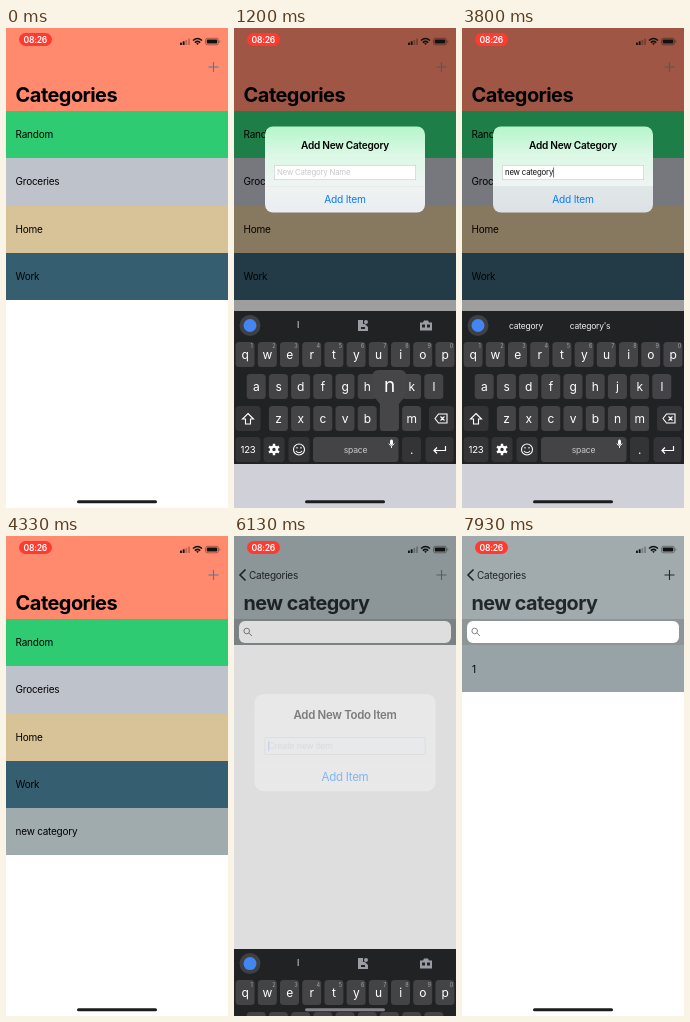
Recreate the animation shown at these times as an HTML page with a canvas. Size 222x480 px, loop 8000 ms.

```html
<!DOCTYPE html>
<html lang="en">
<head>
<meta charset="utf-8">
<title>Todo categories</title>
<style>
  html, body { margin: 0; width: 100%; height: 100%; overflow: hidden; background: #fff; }
  canvas { display: block; width: 222px; height: 480px; }
</style>
</head>
<body>
<canvas id="stage" width="222" height="480"></canvas>
<script>
const ctx = document.getElementById('stage').getContext('2d');
const LOOP = 8000, W = 222, H = 480;
const ROW = 47.25, TOP = 83, KEYBOARD = 197, KEYS_HEIGHT = 153, PITCH = 22.2;
const CORAL = [255, 138, 110], SLATE = [161, 171, 173];
const ROWS = [['Random', '#2fcb72'], ['Groceries', '#bec2cb'], ['Home', '#d8c399'], ['Work', '#355f70']];
const FIRST = { open: 310, tap: 3740, close: 3850 };
const SECOND = { open: 6064, tap: 7380, close: 7450 };
const SELECT = 4980, PUSH = 5080, NUMERIC = 6650;
const HOLD = 100;
const PHRASE = 'new category';
const PRESSES = [1150, 1370, 1560, 1780, 2000, 2200, 2420, 2630, 2860, 3050, 3250, 3450]
  .map((at, i) => ({ at, key: PHRASE[i] }));
const DIGIT = { at: 6930, key: '1' };

// Critically damped spring, 0 to 1
function spring(ms, rate = 0.018) {
  const x = Math.max(0, ms) * rate;
  const p = 1 - (1 + x) * Math.exp(-x);
  return p > 0.995 ? 1 : p;
}
const mix = (a, b, p) => a + (b - a) * p;
const mixColor = (a, b, p) => `rgb(${a.map((v, i) => Math.round(mix(v, b[i], p)))})`;

function rect(x, y, w, h, color, r = 0) {
  ctx.fillStyle = color;
  ctx.beginPath();
  ctx.roundRect(x, y, w, h, r);
  ctx.fill();
}
function text(str, x, y, size, color = '#000', weight = 400, align = 'left') {
  ctx.font = `${weight} ${size}px Inter, sans-serif`;
  ctx.letterSpacing = `${size * (weight > 600 ? -0.028 : -0.025)}px`;
  ctx.textAlign = align;
  ctx.textBaseline = 'alphabetic';
  ctx.fillStyle = color;
  ctx.fillText(str, x, y + size * 0.36);
}
const label = (str, x, y, size, color, weight) => text(str, x, y, size, color, weight, 'center');
function icon(d, x, y, color, width = 1, fill = false) {
  const path = new Path2D(d);
  ctx.save();
  ctx.translate(x, y);
  ctx.lineWidth = width;
  ctx.strokeStyle = ctx.fillStyle = color;
  fill ? ctx.fill(path, 'evenodd') : ctx.stroke(path);
  ctx.restore();
}
function faded(alpha, draw) {
  ctx.save();
  ctx.globalAlpha *= alpha;
  draw();
  ctx.restore();
}
function at(x, y, draw) {
  ctx.save();
  ctx.translate(x, y);
  draw();
  ctx.restore();
}
const plus = color => icon('M-5 0H5M0-5V5', 207.5, 39, color, 1.1);

function categoryList(t) {
  rect(0, TOP, W, H, '#fff');
  const rows = t < FIRST.close ? ROWS
    : [...ROWS, [PHRASE, t < SELECT ? '#a0abae' : '#d8d6dc']];
  rows.forEach(([name, color], i) => {
    const y = Math.round(TOP + i * ROW);
    rect(0, y, W, Math.round(TOP + (i + 1) * ROW) - y, color);
    text(name, 9.6, TOP + (i + 0.5) * ROW, 10);
  });
}

function todoList(t) {
  rect(0, TOP, W, H, '#fff');
  rect(0, TOP, W, 26, '#8d9597');
  rect(5, 85, 212, 22, '#fff', 6);
  icon('M2.5 0a2.8 2.8 0 1 0-5.6 0a2.8 2.8 0 1 0 5.6 0M1.8 2L5 5', 13, 95, '#85858a', 1);
  if (t >= SECOND.close) {
    rect(0, 109, W, 47, '#97a3a6');
    text('1', 10, 133, 10);
  }
}

function screen(t, push, dim) {
  const left = W * (1 - push);
  if (push < 1) {
    at(-67 * push, 0, () => categoryList(t));
    rect(0, TOP, W, H, `rgba(0,0,0,${0.08 * push})`);
  }
  if (push > 0) {
    if (push < 1) {
      const shade = ctx.createLinearGradient(left - 5, 0, left, 0);
      shade.addColorStop(0, 'rgba(0,0,0,0)');
      shade.addColorStop(1, 'rgba(0,0,0,.1)');
      rect(left - 5, TOP, 5, H, shade);
    }
    at(left, 0, () => todoList(t));
  }
  rect(0, 0, W, TOP, mixColor(CORAL, SLATE, push));

  const x = mix(9.6, 15, push), y = mix(66.5, 39, push), size = mix(20, 10, push);
  faded(1 - push, () => {
    text('Categories', x, y, size, '#000', 700);
    plus(mixColor([74, 124, 158], [138, 138, 144], dim));
  });
  // A tapped button dims, then recovers
  const tapped = t > SECOND.open - 100 ? mix(0.35, 1, spring(t - SECOND.open, 0.012)) : 1;
  faded(push * tapped, () => plus('#25292b'));
  faded(push, () => {
    text('Categories', x, y, size, '#202426');
    text(PHRASE, 9.6 + 245 * (1 - push), 66.5, 19.8, '#23272a', 700);
  });
  faded(Math.max(0, push * 8 - 7), () => icon('M3-5.5L-2.5 0L3 5.5', 8.5, 39, '#202426', 1.6));
}

function alertBox(t, p, times, spec) {
  const scale = t < times.close ? 1.2 - 0.2 * p : 1;
  ctx.save();
  ctx.translate(111, 240 - 98.5 * p);
  ctx.scale(scale, scale);
  ctx.globalAlpha = p ** 0.7;
  const fill = ctx.createLinearGradient(0, -43, 0, 43);
  spec.fill.forEach((c, i) => fill.addColorStop(i / (spec.fill.length - 1), c));
  rect(-80, -43, 160, 86, fill, 8);
  if (t > times.tap) rect(-80, 17, 160, 26, 'rgba(70,90,100,.08)', [0, 0, 8, 8]);
  rect(-80, 16.5, 160, 0.5, 'rgba(0,0,0,.06)');
  label(spec.title, 0, -24.3, 10.1, '#000', 600);
  rect(-71, -4.5, 142, 15, '#b9bfc2');
  rect(-70.5, -4, 141, 14, '#fff');
  text(spec.value || spec.hint, -68, 2.8, 7.8, spec.value ? '#111' : '#c9c9cd');
  const end = spec.value ? ctx.measureText(spec.value).width : 0;
  if (t % 1060 > 530) faded(p, () => rect(-68 + end, -2, 1, 10, '#3b74e8'));
  label('Add Item', 0, 30, 10.2, '#0a7aff');
  ctx.restore();
}

function key(name, x, y, w, color = '#444447', size = 12) {
  rect(x - w / 2, y, w, 25, color, 3.5);
  label(name, x, y + 12.5, size, '#fff');
}
function popup(name, x, y) {
  ctx.fillStyle = '#464649';
  ctx.beginPath();
  ctx.roundRect(x - 17, y - 36, 34, 29, 6);
  ctx.roundRect(x - 9.5, y - 8, 19, 33, 4);
  ctx.moveTo(x - 15, y - 9);
  ctx.lineTo(x + 15, y - 9);
  ctx.lineTo(x + 9.5, y - 2);
  ctx.lineTo(x - 9.5, y - 2);
  ctx.fill();
  label(name, x, y - 20.5, 19, '#fff');
}

function suggestions(value) {
  const word = value.split(' ').pop();
  if (!word) {
    label('I', 64, 14, 8.5, '#eee');
    icon('M-5-5H0V-1H2L5 2V6H-5ZM-2 2V4H2V2ZM5-3a2 2 0 1 0-4 0a2 2 0 1 0 4 0', 129, 14, '#9a9ea3', 1, true);
    icon('M-6-3H-3L-2-5H2L3-3H6V5H-6ZM-4-1V2H-1V-1ZM1-1V2H4V-1Z', 192, 14.5, '#9a9ea3', 1, true);
    return;
  }
  const full = value.includes(' ') ? 'category' : 'new';
  label(word, 64, 14.5, 8.5, '#eee');
  label(word === full ? full + (full === 'new' ? 's' : "'s") : full, 128, 14.5, 8.5, '#eee');
}

function keyboard(top, numeric, value, pressed) {
  const DARK = '#343437';
  ctx.save();
  ctx.translate(0, top);
  rect(0, 0, W, KEYBOARD, '#d0d1d8');
  rect(0, 0, W, KEYS_HEIGHT, '#212224');
  rect(5.5, 4, 21, 21, '#3e4043', 10.5);
  rect(9.5, 8, 13, 13, '#4285f4', 6.5);
  if (!numeric) suggestions(value);

  const rows = numeric ? ['1234567890', '-/:;()$&@"', ".,?!'"] : ['qwertyuiop', 'asdfghjkl', 'zxcvbnm'];
  let held = null;
  rows.forEach((row, r) => {
    const wide = numeric && r === 2;
    const step = wide ? 31.2 : PITCH, y = 31 + 32 * r;
    [...row].forEach((c, i) => {
      const x = 111 + (i - (row.length - 1) / 2) * step;
      key(c, x, y, wide ? 28 : 19);
      if (!numeric && r === 0) label((i + 1) % 10, x + 6.5, y + 4.5, 5.5, '#a5a5a8');
      if (c === pressed) held = [c, x, y];
    });
  });

  key(numeric ? '#+=' : '', 14, 95, 25, DARK, 8);
  if (!numeric) icon('M0-5.5L5.5 0H2.5V5H-2.5V0H-5.5Z', 14, 108, '#fff', 1.1);
  key('', 207.5, 95, 25, DARK);
  icon('M-6 0L-2.5-4.5H6V4.5H-2.5ZM-.5-2L3.5 2M3.5-2L-.5 2', 207, 107.5, '#fff', 1.1);
  key(numeric ? 'ABC' : '123', 14, 126, 25, DARK, 9.6);
  key('', 40, 126, 21, DARK);
  icon('M0-5.8V5.8M-5-2.9L5 2.9M-5 2.9L5-2.9', 40, 138.5, '#fff', 2.4);
  icon('M-4 0a4 4 0 1 0 8 0a4 4 0 1 0-8 0', 40, 138.5, '#fff', 1, true);
  icon('M-1.7 0a1.7 1.7 0 1 0 3.4 0a1.7 1.7 0 1 0-3.4 0', 40, 138.5, DARK, 1, true);
  key('', 65, 126, 21, DARK);
  icon('M-5.5 0a5.5 5.5 0 1 0 11 0a5.5 5.5 0 1 0-11 0M-3 1.5Q0 5 3 1.5M-2-2.5V-1M2-2.5V-1', 65, 138.5, '#fff', 1.1);
  rect(79, 126, 85.5, 25, pressed === ' ' ? '#626266' : '#444447', 3.5);
  label('space', 121.5, 138.5, 8.6, '#c9c9cc');
  if (numeric) {
    key('return', 194, 126, 51, DARK, 9.6);
  } else {
    icon('M-1.5-3.5V0Q0 1.8 1.5 0V-3.5Q0-5.4 -1.5-3.5', 157.5, 133, '#fff', 1, true);
    icon('M-2.7-.5Q0 4 2.7-.5M0 2V4', 157.5, 133, '#fff', 0.9);
    key('.', 177.5, 126, 19, DARK);
    key('', 205.5, 126, 28, DARK);
    icon('M6-3.5V1H-5.5M-2.5-2L-5.5 1L-2.5 4', 205.5, 138.5, '#fff', 1.2);
  }
  if (held) popup(...held);
  ctx.restore();
}

function statusBar() {
  rect(13, 5, 33, 13, '#ff3b30', 6.5);
  label('08:26', 29.3, 11.6, 8.6, '#fff', 600);
  for (let i = 0; i < 4; i++) {
    rect(174 + i * 2.7, 14.5 - i * 1.3, 1.9, 2.5 + i * 1.3, i < 2 ? '#111' : 'rgba(0,0,0,.25)', 0.5);
  }
  icon('M-4.5-1.5Q0-5.5 4.5-1.5M-2.7.6Q0-1.8 2.7.6', 191.5, 14, '#111', 1.5);
  icon('M-1.4 1.5Q0 .4 1.4 1.5L0 3Z', 191.5, 14, '#111', 1, true);
  icon('M2 0H11Q13 0 13 2V4.5Q13 6.5 11 6.5H2Q0 6.5 0 4.5V2Q0 0 2 0M14.3 2.3V4.2', 199.5, 10.3, 'rgba(0,0,0,.45)', 0.8);
  rect(200.7, 11.5, 10.6, 4.1, '#111', 1);
}

function render(t) {
  const isFirst = t < 5000;
  const times = isFirst ? FIRST : SECOND;
  const p = spring(t - times.open) * (1 - spring(t - times.close));
  const presses = isFirst ? PRESSES : [DIGIT];
  const value = presses.filter(k => t >= k.at + HOLD).map(k => k.key).join('');
  const pressed = presses.find(k => t >= k.at && t < k.at + HOLD)?.key;
  const keysTop = H - KEYBOARD * p;

  ctx.clearRect(0, 0, W, H);
  screen(t, spring(t - PUSH, 0.014), p);
  if (p > 0) {
    rect(0, 0, W, H, `rgba(3,0,0,${0.38 * p})`);
    keyboard(keysTop, t >= NUMERIC, value, pressed);
    alertBox(t, p, times, isFirst
      ? { title: 'Add New Category', hint: 'New Category Name', value, fill: ['#b5f5cb', '#dcf8e6', '#eef4f2', '#eaedf1'] }
      : { title: 'Add New Todo Item', hint: 'Create new item', value, fill: ['#f3f3f4', '#f5f5f6'] });
  }
  statusBar();
  // The home bar turns light over the dark keys
  const overKeys = keysTop < 473 && keysTop + KEYS_HEIGHT > 473;
  rect(71, 472.3, 80, 3, overKeys ? '#85858a' : '#1c1c1e', 1.5);
}

function tick() {
  render(performance.now() % LOOP);
  requestAnimationFrame(tick);
}
tick();
</script>
</body>
</html>
```
